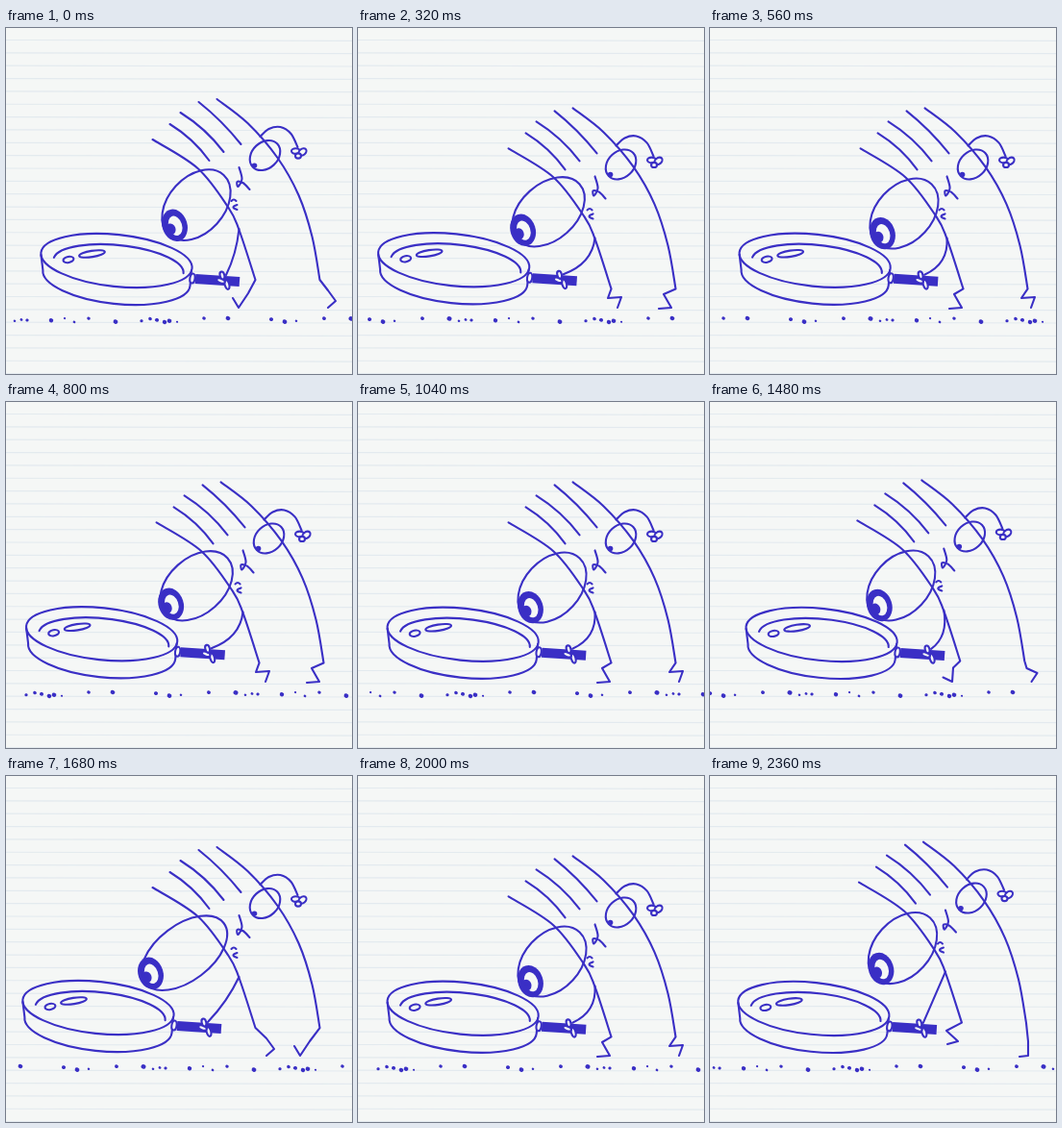
An HTML page with a canvas for the animation above (2400 ms loop, 360 by 360 pixels).

```html
<!DOCTYPE html>
<html lang="en">
<head>
<meta charset="utf-8">
<title>Searching with a magnifying glass</title>
<style>
html, body { margin: 0; overflow: hidden; background: #f5f7f6; }
canvas { display: block; }
</style>
</head>
<body>
<canvas id="stage" width="360" height="360"></canvas>
<script>
const ctx = document.getElementById('stage').getContext('2d');
const INK = '#3a2fc5', PAPER = '#f5f7f6', RULE = '#e3eaef';
const SIZE = 360, STEP = 40, WALK = 480, BOUNCE = WALK / 2, GROUND = 1200, LOOP = 2400;

// One stride: time, then knee, heel and toe. The legs are half a cycle apart.
const stride = [
  [0, 252, 276, 242, 291, 236, 281],
  [80, 254, 277, 262, 291, 249, 292],
  [200, 267, 276, 267, 291, 258, 292],
  [240, 271, 273, 279, 284, 271, 291],
  [320, 260, 281, 274, 280, 270, 291],
  [440, 246, 265, 258, 276, 247, 279]];

const pebbles = [-1, 9, 16, 22, 47, 61, 71, 86, 114, 141, 150, 157, 165, 170, 178, 206, 231, 276, 290, 302, 331];

const wave = (t, period, peak = 0) => Math.cos(2 * Math.PI * (t - peak) / period);

function poseAt(t) {
  const body = [2.75 - 3.4 * wave(t, BOUNCE, 11), 1 - 7.7 * wave(t, BOUNCE, 190)];
  const stretch = ((1 - wave(t, WALK)) / 2) ** 4;
  return {
    body,
    pupil: [176 + body[0] - 25 * stretch, 206 + .7 * body[1] + 2 * wave(t, WALK, 120)],
    lens: [-13 + 9.5 * wave(t, WALK) + 5.9 * wave(t, BOUNCE, 36), -.5 + .5 * wave(t, WALK)]
  };
}

function footAt(t) {
  t %= WALK;
  const i = stride.findLastIndex(key => key[0] <= t);
  const from = stride[i], to = stride[(i + 1) % stride.length];
  const u = (t - from[0]) / ((to[0] || WALK) - from[0]);
  return from.slice(1).map((v, k) => v + (to[k + 1] - v) * u);
}

// Smooth path through the points.
function trace(points) {
  const at = i => points[Math.max(0, Math.min(points.length - 1, i))];
  ctx.beginPath();
  ctx.moveTo(...points[0]);
  for (let i = 0; i < points.length - 1; i++) {
    const [a, b, c, d] = [at(i - 1), at(i), at(i + 1), at(i + 2)];
    ctx.bezierCurveTo(b[0] + (c[0] - a[0]) / 6, b[1] + (c[1] - a[1]) / 6,
      c[0] - (d[0] - b[0]) / 6, c[1] - (d[1] - b[1]) / 6, ...c);
  }
}

function curve(...points) {
  trace(points);
  ctx.stroke();
}

// Curve between two points, its middle pulled aside by (bx, by).
function bow(x1, y1, x2, y2, bx, by) {
  ctx.beginPath();
  ctx.moveTo(x1, y1);
  ctx.quadraticCurveTo((x1 + x2) / 2 + bx, (y1 + y2) / 2 + by, x2, y2);
  ctx.stroke();
}

function oval(x, y, rx, ry, degrees = 0, fill) {
  ctx.beginPath();
  ctx.ellipse(x, y, rx, ry, degrees * Math.PI / 180, 0, 2 * Math.PI);
  if (fill) {
    ctx.fillStyle = fill;
    ctx.fill();
  }
  if (fill !== INK) ctx.stroke();
}

function movedBy([dx, dy], draw) {
  ctx.save();
  ctx.translate(dx, dy);
  draw();
  ctx.restore();
}

function paper() {
  ctx.fillStyle = PAPER;
  ctx.fillRect(0, 0, SIZE, SIZE);
  ctx.strokeStyle = RULE;
  ctx.lineWidth = 1.2;
  for (let y = 12.5; y < SIZE; y += 13.35) bow(0, y, SIZE, y + .8, 0, 0);
}

function ground(t) {
  for (const x of pebbles) {
    const r = 1 + ((x + 59) % 59) / 45;
    oval((x + SIZE * t / GROUND + SIZE) % SIZE, 304 + 2 * Math.sin(x), r * 1.1, r, 20, INK);
  }
}

function magnifier() {
  const tilt = Math.PI / 30;
  oval(115, 242, 79, 27, 6);
  ctx.beginPath();
  ctx.moveTo(193, 252);
  ctx.ellipse(115, 260, 77, 27, tilt, 0, Math.PI);
  ctx.lineTo(36.5, 236);
  ctx.stroke();
  ctx.beginPath();
  ctx.ellipse(117, 248, 68, 22, tilt, Math.PI * 1.03, Math.PI * 2);
  ctx.stroke();
  oval(65, 241, 5.5, 3, -10);
  oval(89.5, 235, 13.5, 3.2, -9);
  ctx.save();
  ctx.lineWidth = 10;
  ctx.lineCap = 'butt';
  bow(197, 261, 243, 264, 0, 0);
  ctx.restore();
  oval(194, 260.5, 2.6, 5, 8, PAPER);
}

function hand() {
  oval(230, 267, 2.3, 5, -15, PAPER);
  oval(223.5, 263, 4.5, 2.3, 20, PAPER);
  oval(225, 257.5, 2.3, 4, -15, PAPER);
}

function head() {
  bow(171, 101, 212, 139, 4, -4);
  bow(182, 89, 227, 130, 4, -4);
  bow(201, 78, 245, 122, 2, -3);
  oval(270, 133.5, 17.5, 13.5, -43);
  oval(259, 144, 2.8, 2.6, 0, INK);
  curve([265, 114], [274, 106], [286, 104], [297, 111], [304, 125]);
  oval(302, 129, 4.5, 2.8, 0, PAPER);
  oval(309, 130, 4.5, 3.2, -40, PAPER);
  oval(304.5, 134, 3, 2.6, 0, PAPER);
  curve([243, 146], [246, 158], [242, 166], [241, 161], [247, 162], [254, 169]);
  bow(235, 181, 240, 181, 0, -3);
  bow(241, 185, 241, 190, -8, 0);
}

function leg(points, [hipX, hipY], foot, shift) {
  trace([...points, [hipX, hipY]]);
  for (let i = 0; i < foot.length; i += 2) ctx.lineTo(foot[i] + shift, foot[i + 1]);
  ctx.stroke();
}

// The eyeball spans from the pupil to a corner fixed on the head.
function bigEye(body, pupil) {
  const cornerX = 227 + body[0], cornerY = 154 + body[1];
  const nearX = pupil[0] - 6, nearY = pupil[1] + 10;
  const dx = cornerX - nearX, dy = cornerY - nearY;
  oval((cornerX + nearX) / 2, (cornerY + nearY) / 2, Math.hypot(dx, dy) / 2, 29, Math.atan2(dy, dx) * 180 / Math.PI);
  movedBy(pupil, () => {
    oval(0, 0, 13, 17, -18, INK);
    oval(.7, .5, 8, 11.5, -18, PAPER);
    oval(-4, 4, 5, 6, -18, INK);
    oval(-4.5, 2, 1, 1.2, 0, PAPER);
  });
}

function draw(now) {
  const t = Math.floor(now / STEP) * STEP;
  const { body, pupil, lens } = poseAt(t);
  const onBody = (...points) => points.map(([x, y]) => [x + body[0], y + body[1]]);
  ctx.lineCap = ctx.lineJoin = 'round';
  paper();
  ctx.strokeStyle = INK;
  ctx.lineWidth = 2.1;
  ground(t);

  const [shoulder, frontHip, backHip] = onBody([243, 210], [260, 263], [327, 263]);
  leg(onBody([153, 117], [200, 147], [232, 188], [243, 211]), frontHip, footAt(t), 0);
  leg(onBody([220, 75], [252, 100], [283, 136], [305, 175], [319, 218]), backHip, footAt(t + BOUNCE), 64);
  movedBy(body, head);
  bigEye(body, pupil);
  movedBy(lens, magnifier);
  const bend = Math.max(0, 5 + body[1]);
  bow(...shoulder, 229 + lens[0], 257 + lens[1], bend, bend * .6);
  movedBy(lens, hand);
}

function tick() {
  draw(performance.now() % LOOP);
  requestAnimationFrame(tick);
}
tick();
</script>
</body>
</html>
```
